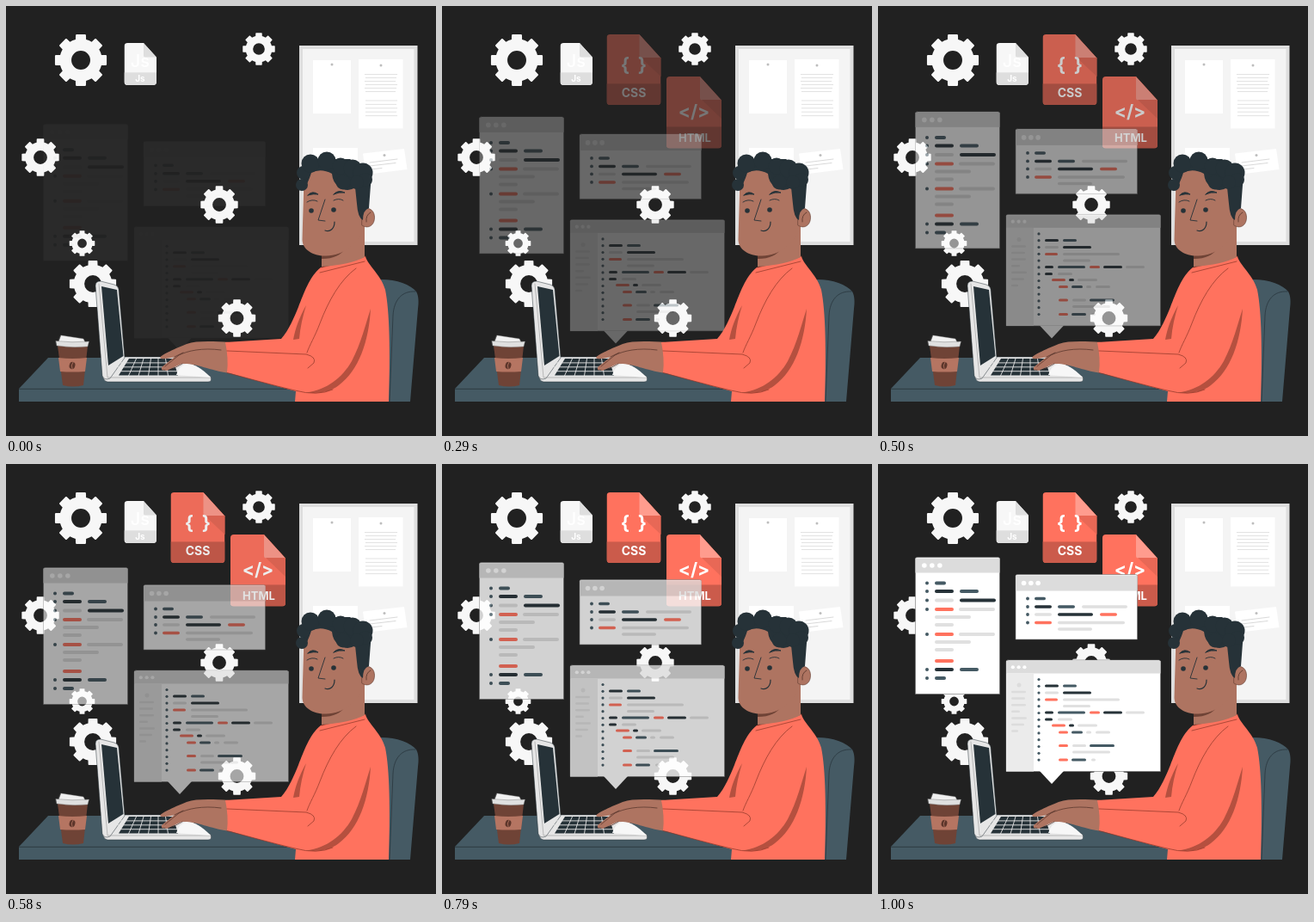
An HTML page with a canvas that plays this animation: 500x500 px, repeating every 1040 ms.

```html
<!DOCTYPE html>
<html lang="en">
<head>
<meta charset="utf-8">
<title>Developer at a desk</title>
<style>
html, body { margin: 0; width: 100%; height: 100%; overflow: hidden; background: #212121; }
canvas { display: block; width: 500px; height: 500px; }
</style>
</head>
<body>
<canvas id="stage" width="500" height="500"></canvas>
<script>
const LOOP = 1040, FPS = 24, STEPS = 25, RISE = 30;
const BG = '#212121', DARK = '#263238', SLATE = '#455a64', RED = '#ff725e', GRAY = '#e0e0e0';
const SKIN = '#ae7461', SHADE = '#b5503f';
const TONE = { d: DARK, s: SLATE, r: RED, g: GRAY };

function makeLayer() {
  const c = document.createElement('canvas');
  c.width = c.height = 500;
  return c.getContext('2d');
}

function shape(g, d, fill, stroke, width = 0.8) {
  const p = new Path2D(d);
  if (fill) { g.fillStyle = fill; g.fill(p); }
  if (stroke) {
    g.strokeStyle = stroke;
    g.lineWidth = width;
    g.lineCap = g.lineJoin = 'round';
    g.stroke(p);
  }
}

function rect(g, x, y, w, h, fill) {
  g.fillStyle = fill;
  g.fillRect(x, y, w, h);
}

function dot(g, x, y, r, fill) {
  g.fillStyle = fill;
  g.beginPath();
  g.arc(x, y, r, 0, Math.PI * 2);
  g.fill();
}

function bar(g, x1, x2, y, w, color) {
  g.strokeStyle = color;
  g.lineWidth = w;
  g.lineCap = 'round';
  g.beginPath();
  g.moveTo(x1 + w / 2, y);
  g.lineTo(x2 - w / 2, y);
  g.stroke();
}

function label(g, text, x, y, size) {
  g.fillStyle = '#fff';
  g.font = `700 ${size}px Inter, "Open Sans", sans-serif`;
  g.textAlign = 'center';
  g.fillText(text, x, y);
}

function gear(g, x, y, r) {
  g.fillStyle = '#f7f7f7';
  g.beginPath();
  for (let i = 0; i < 8; i++) {
    const a = i * Math.PI / 4;
    for (const [da, k] of [[-0.25, 0.81], [-0.2, 0.98], [-0.17, 1], [0.17, 1], [0.2, 0.98], [0.25, 0.81]])
      g.lineTo(x + Math.cos(a + da) * r * k, y + Math.sin(a + da) * r * k);
    g.arc(x, y, r * 0.81, a + 0.25, a + Math.PI / 4 - 0.25);
  }
  g.closePath();
  g.moveTo(x + r * 0.36, y);
  g.arc(x, y, r * 0.36, 0, Math.PI * 2, true);
  g.fill('evenodd');
}

// Document with a folded corner and a name band
function file(g, x, y, w, h, fold, tones) {
  const r = x + w, b = y + h, f = r - fold, k = 4;
  g.save();
  g.clip(new Path2D(`M${x + k} ${y}H${f}L${r} ${y + fold * 1.1}V${b - k}Q${r} ${b} ${r - k} ${b}H${x + k}Q${x} ${b} ${x} ${b - k}V${y + k}Q${x} ${y} ${x + k} ${y}Z`));
  rect(g, x, y, w, h, tones[0]);
  rect(g, x, y + h * 0.7, w, h * 0.3, tones[1]);
  shape(g, `M${f} ${y}V${y + fold}Q${f} ${y + fold * 1.1} ${f + 3} ${y + fold * 1.1}H${r}Z`, tones[2]);
  g.restore();
}

function board(g) {
  rect(g, 341, 46, 137.5, 232, '#dedede');
  rect(g, 345, 50, 129.5, 224, '#f4f4f4');
  rect(g, 357, 63, 44, 62, '#fff');
  rect(g, 410, 62, 51.5, 80.5, '#fff');
  rect(g, 357, 165, 52, 60, '#fff');
  shape(g, 'M415 171.5L463 166L466.500 190L418 196Z', '#fff');
  dot(g, 379, 68, 1.5, '#bdbdbd');
  dot(g, 436, 69, 1.5, '#bdbdbd');
  dot(g, 440, 173.5, 1.5, '#bdbdbd');
  for (let i = 0; i < 6; i++) bar(g, 417 + i % 2, 455 - i % 3, 79.5 + i * 4, 0.7, '#d6d6d6');
  for (let i = 0; i < 5; i++) bar(g, 418, 455 - i % 2, 110 + i * 4.4, 0.7, '#d6d6d6');
  shape(g, 'M423 182L455 178M423 186L453 182.500M424 190L437 188.500', null, '#d0d0d0');
}

function rows(g, list, w) {
  for (const [y, spec] of list)
    for (const part of spec.split(' ')) {
      const [a, b] = part.slice(1).split('-').map(Number);
      bar(g, a, b, y, w, TONE[part[0]]);
    }
}

function frame(g, x, y, w, h, head, gap, r) {
  shape(g, `M${x + 2} ${y}h${w - 4}q2 0 2 2v${h - 2}h${-w}v${2 - h}q0 -2 2 -2Z`, '#fff', '#707070', 0.6);
  rect(g, x, y + 1, w, head - 1, '#dcdcdc');
  for (let i = 0; i < 3; i++) dot(g, x + gap * (i + 1.15), y + head / 2 + 0.5, r, '#fff');
}

function windows(g) {
  frame(g, 43.5, 108.5, 98, 159, 18, 9, 2.8);
  for (const y of [138.5, 148, 158.5, 169, 198, 239, 249]) dot(g, 57, y, 2, SLATE);
  rows(g, [
    [138.5, 's66-79'], [148, 'd66-88 s95-117'], [158.5, 'g66-88 d95-137'],
    [169, 'r66-88 g94-136'], [178, 'g66-108'], [187, 'g66-88'],
    [198, 'r66-88 g94-136'], [207, 'g66-108'], [216, 'g66-88'],
    [229, 'r66-88'], [239, 'd66-88 s95-117'], [249, 's66-79']
  ], 4);

  frame(g, 160, 128.5, 141.5, 75.5, 19, 8.3, 2.8);
  for (const y of [156.5, 166, 175, 184.5]) dot(g, 174, y, 1.9, SLATE);
  rows(g, [
    [156.5, 's182-195'], [166, 'd182-202 s209-229 g237-290'],
    [175, 'g182-202 d209-250 r258-278'], [184.5, 'r182-202 g209-287'], [192, 'g209-249']
  ], 3.5);

  frame(g, 149, 228, 179.5, 129.5, 15.5, 6.8, 2.1);
  rect(g, 149, 243.5, 32, 114, '#ebebeb');
  shape(g, 'M188 357L202 372L216 357Z', '#fff');
  dot(g, 164, 257, 2.5, '#dcdcdc');
  [172, 171, 172, 165, 173, 170, 163].forEach((x, i) => bar(g, 155, x, 265 + i * 7.6, 2.5, '#dcdcdc'));
  for (let i = 0; i < 13; i++) dot(g, 187, 250.5 + i * 7.8, 1.6, SLATE);
  rows(g, [
    [258, 'd194-210 s215-231'], [266, 'g194-210 d215-248'], [274, 'r194-209 g215-281'],
    [281.5, 'g215-247'], [289, 'd194-204 s209-241 r246-258 d262-284 g288-310'],
    [297, 'd194-203 g209-226'], [304, 'r202-218 d222-228 g232-255'],
    [312, 'r210-221 s225-238 g242-248 g253-270'], [327.5, 'r210-221 g226-242 s246-275'],
    [335, 'g226-270'], [344, 'r210-221 s225-242 g248-253']
  ], 3);
}

function icons(g) {
  const tones = [RED, '#cb5b4b', '#ff9c8e'];
  file(g, 191.5, 33, 63, 82, 25, tones);
  shape(g, 'M231 60L254.500 82V60Z', '#e86856');
  label(g, '{', 213, 76, 22);
  label(g, '}', 233, 76, 22);
  label(g, 'CSS', 223, 106, 14);
  file(g, 261, 82, 64, 83.5, 25, tones);
  shape(g, 'M302 109L325 131V109Z', '#e86856');
  label(g, '</>', 293, 130, 21);
  label(g, 'HTML', 294, 158, 13);
}

function script(g) {
  file(g, 137.5, 43, 37.5, 49, 15, ['#f7f7f7', '#dedede', '#dedede']);
  g.font = '500 20px Inter, sans-serif';
  g.textAlign = 'center';
  g.fillStyle = '#fff';
  g.fillText('Js', 156, 71);
  label(g, 'Js', 156, 87.5, 10);
}

function desk(g) {
  shape(g, 'M15 445L49 409H345V460H15Z', SLATE);
  shape(g, 'M15.500 445.300H340', null, DARK);
}

function cup(g) {
  shape(g, 'M60 395H95L90 441Q78 444 66 441Z', '#6f4336');
  shape(g, 'M61 409Q77 411 94 409L92 425Q77 426 63 425Z', '#b57562');
  g.save();
  g.translate(77, 418);
  g.rotate(0.3);
  g.scale(0.8, 1);
  dot(g, 0, 0, 4.2, '#5d362b');
  g.restore();
  shape(g, 'M78 414Q75 418 77 422', null, '#b57562');
  shape(g, 'M64 383L90 387L92 391H61Z', '#f0f0f0', '#a0a0a0', 0.4);
  shape(g, 'M58 389.500Q77 392 96.500 390L95 396Q77 398 59 395Z', GRAY, '#777', 0.4);
}

function laptop(g) {
  shape(g, 'M137 408H205L238 431Q240 437 235 437H118Q113 436 113 430Z', '#e6e6e6', DARK, 0.5);
  shape(g, 'M104 325Q104 320 110 320L126 324Q130 325 131 329L138 409L121 433Q114 436 112 430Z', '#e6e6e6', DARK, 0.5);
  shape(g, 'M111 326L129 330L136.500 407L119 418Z', DARK);
  shape(g, 'M108 323L118 432H238', null, '#888', 0.5);
  shape(g, 'M143 410H194L200 429.500H131Z', DARK);
  for (let i = 1; i < 4; i++) bar(g, 130, 203, 410 + i * 4.9, 0.9, '#e6e6e6');
  for (let i = 1; i < 6; i++) shape(g, `M${143 + i * 8.5} 410L${131 + i * 11.5} 430`, null, '#e6e6e6', 0.9);
  shape(g, 'M198 429Q202 417 210 416Q223 416 238 432Z', '#f7f7f7');
}

function hands(g) {
  shape(g, 'M260 391C240 390 222 389 210 393C198 398 181 405 179 409C182 412 190 409 196 408L181 420Q180 425 185 423L200 413L230 418L260 427Z', SKIN);
  shape(g, 'M260 399C235 397 215 399 201 406L185 418Q182 424 187 424L204 416C222 415 234 423 260 427Z', SKIN);
  shape(g, 'M250 400C228 397 211 401 201 406L185 419M196 408L206 403M205 416L192 423', null, '#4f3028', 0.7);
}

function chair(g) {
  shape(g, 'M436 318C455 318 470 324 477 332C480 337 480 345 479 352L470 460H436Z', SLATE);
  shape(g, 'M446 460L450 360C451 342 460 331 476 332', null, DARK, 0.7);
}

function body(g) {
  shape(g, 'M366 304L418 291C420 301 436 312 441 330C446 355 447 400 445 460H336L337 448C310 441 282 433 257 426Q259 410 255 391L320 387C329 377 335 362 340 350C346 335 353 314 366 304Z', RED);
  shape(g, 'M424 352C422 390 410 424 387 441C377 449 363 451 349 449.500C374 446 391 432 402 413C413 392 418 370 424 352Z', SHADE);
  shape(g, 'M349 348C341 362 336 376 334 388L341 387C342 374 345 361 349 348Z', SHADE);
  shape(g, 'M407 305C388 319 375 343 365 369C359 385 353 394 350 403M257 401L349 405Q361 408 358 415L351 421M257 426.500C282 433 310 441 336 447Q362 454 380 446M365 310L417 297M367 304L418 291', null, '#8a3528', 0.7);
}

function head(g) {
  shape(g, 'M367 255H417V292Q400 301 367 303Z', SKIN);
  shape(g, 'M367 286L396 280Q388 294 367 294Z', '#6f4336');
  shape(g, 'M346 190V215L344.500 272C345 284 358 291 372 290.500C393 290 407 278 417 258V190Z', SKIN);
  shape(g, 'M414 238C418 233 428 235 428.500 245C429 255 421 260 414 255Z', SKIN, '#5f392e', 0.6);
  shape(g, 'M424 240Q418 243 419 251', null, '#4a2b23', 0.7);

  // Hair stays above a high forehead and runs down into a sideburn
  shape(g, 'M345 188L360 178H400L425 195L422 235Q415 237 415 249Q409 246 408 230L406 211Q396 218 386 209Q380 205 379 195Q366 188 355 194Q351 207 345 215Z', DARK);
  for (const [x, y, r] of [[344, 208, 7], [346, 194, 8], [354, 183, 10.5], [373, 180, 10.5], [389, 186, 9.5],
    [403, 189, 10.5], [415, 194, 11.5], [418, 202, 8], [392, 205, 8.5], [408, 205, 8]])
    dot(g, x, y, r, DARK);

  dot(g, 355, 238, 2.8, DARK);
  dot(g, 381, 237, 2.8, DARK);
  shape(g, 'M351 220Q356 214 363 219Q358 218 351 220ZM381 219Q386 213 394 217Q387 216 381 219Z', DARK, DARK, 1);
  shape(g, 'M350 228Q356 224 362 227M381 226Q387 223 392 226M371 225L363 249L371 250', null, DARK, 0.9);
  shape(g, 'M371 261C377 263 382 259 382 251', null, DARK, 1.2);
}

function paint(draw) {
  const g = makeLayer();
  draw(g);
  return g.canvas;
}

const ctx = document.getElementById('stage').getContext('2d');
const moving = makeLayer();
const back = paint(g => {
  rect(g, 0, 0, 500, 500, BG);
  board(g);
  script(g);
  for (const [x, y, r] of [[87, 63, 30.5], [294, 50, 19], [40, 176, 22], [248, 231, 22],
    [88.5, 276, 15], [101, 323, 27.5], [268.5, 363, 22]]) gear(g, x, y, r);
});
const badges = paint(icons);
const front = paint(g => [desk, cup, laptop, chair, hands, body, head].forEach(draw => draw(g)));

function blend(layer, alpha) {
  ctx.globalAlpha = alpha;
  ctx.drawImage(layer, 0, 0);
  ctx.globalAlpha = 1;
}

const clamp = v => Math.max(0, Math.min(1, v));

function render(time) {
  const n = Math.min(STEPS - 1, Math.floor(time % LOOP * FPS / 1000 + 0.1));
  const p = (n + 1) / STEPS;
  blend(back, 1);
  blend(badges, clamp((n - 2) / 13));

  moving.clearRect(0, 0, 500, 500);
  moving.save();
  moving.translate(0, RISE * (1 - p));
  windows(moving);
  moving.restore();
  blend(moving.canvas, p);
  blend(front, 1);
}

const start = performance.now();
function tick() {
  render(performance.now() - start);
  requestAnimationFrame(tick);
}
tick();
</script>
</body>
</html>
```
